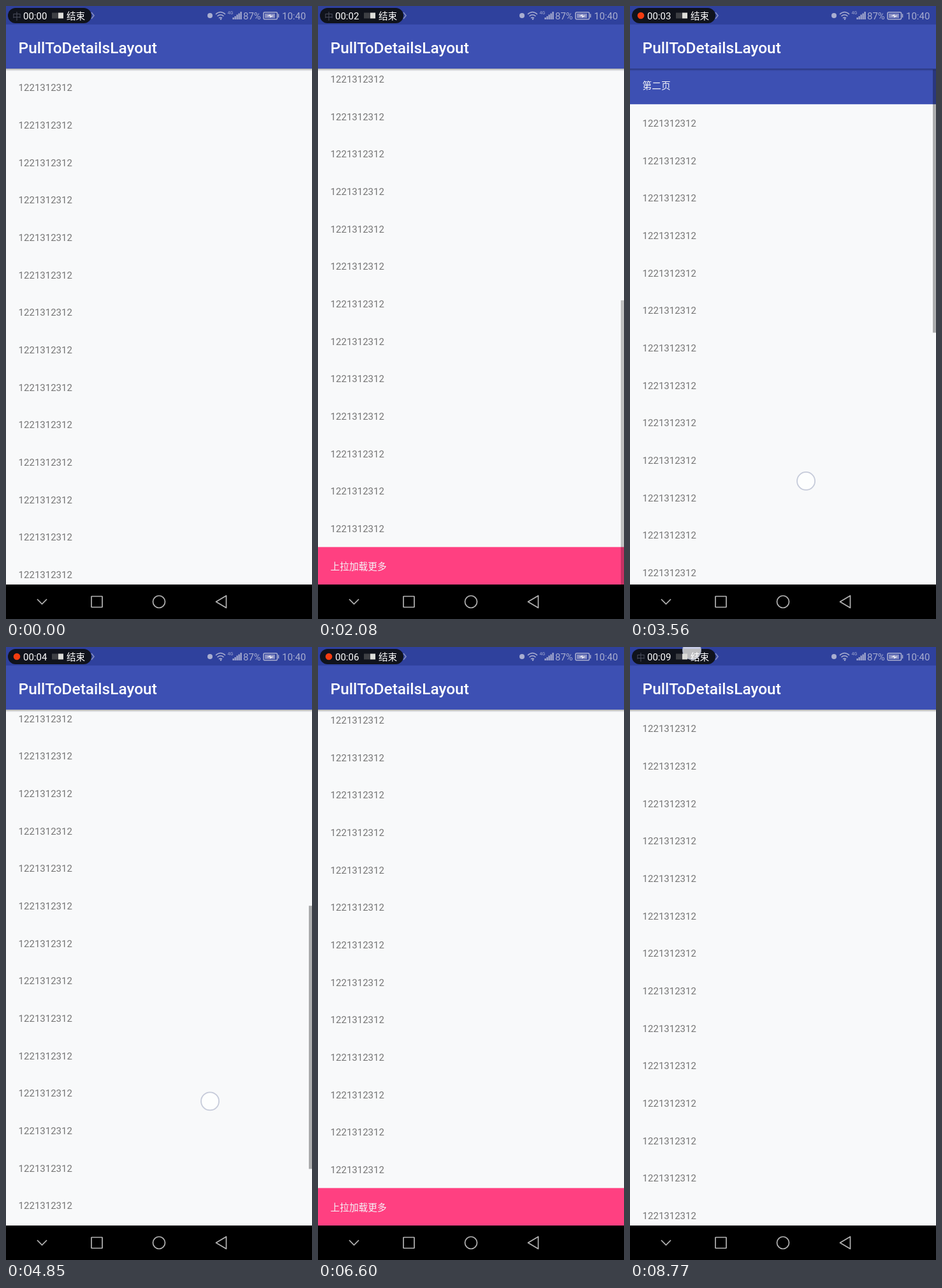
Animation of 480x960 px, one loop 8.81 s. Source, as an HTML page:

```html
<!DOCTYPE html>
<html lang="zh">
<head>
<meta charset="utf-8">
<title>PullToDetailsLayout</title>
<style>
  html, body { margin: 0; width: 100%; height: 100%; overflow: hidden; background: #000; }
  #stage { display: block; width: 100vw; height: 100vh; }
  text { font-family: Roboto, "Noto Sans CJK SC", "Noto Sans CJK", sans-serif; }
  .row { font-size: 15px; fill: #757575; }
  .label { font-size: 14.67px; fill: #f4f4f8; }
  .status { font-size: 15px; fill: #a9aed0; }
  .line { fill: none; stroke: #b4b4b4; stroke-width: 1.7; }
  .thin { fill: none; stroke: #a9aed0; stroke-width: 1.6; }
</style>
</head>
<body>
<svg id="stage" viewBox="0 0 480 960">
  <defs>
    <linearGradient id="shade" x2="0" y2="1">
      <stop offset="0" stop-color="#000" stop-opacity=".32"/>
      <stop offset="1" stop-color="#000" stop-opacity="0"/>
    </linearGradient>
  </defs>

  <svg y="98" width="480" height="808">
    <rect width="480" height="808" fill="#f8f9fa"/>
    <svg id="first" width="480" height="808"><g></g><rect x="475" width="5" fill="#000"/></svg>
    <svg id="second" width="480" height="808"><g></g><rect x="475" width="5" fill="#000"/></svg>
    <rect width="480" height="4" fill="url(#shade)"/>
  </svg>

  <rect width="480" height="30" fill="#2f419d"/>
  <rect y="29" width="480" height="69" fill="#3d50b3"/>
  <text x="19.6" y="74" font-size="24.44" font-weight="500" fill="#fff">PullToDetailsLayout</text>

  <!-- status icons -->
  <circle cx="320" cy="15" r="4" fill="#a9aed0"/>
  <path class="thin" d="M329 13q7.5-7 15 0M331.500 16q5-4.500 10 0M334 19q2.500-2 5 0"/>
  <circle cx="337" cy="20.500" r="1.200" fill="#a9aed0"/>
  <text x="347.500" y="13" font-size="7" fill="#a9aed0">4G</text>
  <path d="M355.500 21v-3h2.200v3zM358.500 21v-5h2.200v5zM361.500 21v-7.500h2.200v7.500zM364.500 21v-9.500h2.200v9.500zM367.500 21v-12h2.200v12z" fill="#a9aed0"/>
  <text class="status" x="372" y="20.500">87%</text>
  <rect class="thin" x="404" y="9.800" width="21.500" height="11" rx="2"/>
  <rect x="406" y="11.800" width="16" height="7" fill="#8a90c4"/>
  <path d="M409 16l6-3v2h5l-6 3.500v-2.500z" fill="#e6e6f2"/>
  <path d="M427.500 12.500v5.500" stroke="#a9aed0" stroke-width="1.500"/>
  <text class="status" x="433" y="20.500">10:40</text>

  <!-- navigation bar -->
  <rect y="906" width="480" height="54"/>
  <path class="line" d="M49 929l7.500 7.500 7.500-7.500"/>
  <rect class="line" x="134" y="924.500" width="17" height="17" rx=".5"/>
  <circle class="line" cx="240" cy="933" r="9.500"/>
  <path class="line" stroke-linejoin="round" d="M345.500 923.500v19l-16-9.500z"/>

  <!-- recorder pill; the touch mark passes below its text -->
  <path class="thin" d="M134 10l4 5-4 5" opacity=".7"/>
  <rect x="3" y="3" width="131" height="24" rx="12" fill="#10131c"/>
  <circle id="touch" r="14" fill="#fff" fill-opacity=".72" stroke="#bcc2d4" stroke-opacity=".85" stroke-width="1.800"/>
  <text id="carrier" x="10" y="20.500" font-size="14" fill="#474a58">中</text>
  <circle id="dot" cx="17" cy="15" r="5.300" fill="#f43c10"/>
  <text id="clock" x="27" y="20.500" font-size="15" fill="#fff"></text>
  <rect x="72" y="10.500" width="10" height="9" fill="#3d3f44"/>
  <rect x="82" y="10.500" width="8" height="9" fill="#dcdcd8"/>
  <text x="95" y="20.700" font-size="14.600" fill="#fff">结束</text>
</svg>
<script>
const LOOP = 8810, VIEW = 808, ROW = 176 / 3;
const $ = id => document.getElementById(id);

const linear = p => p;
const outQuad = p => 1 - (1 - p) ** 2;
const outCubic = p => 1 - (1 - p) ** 3;

// Keys are [time, value, easing into this key].
function track(keys, t) {
  if (t <= keys[0][0]) return keys[0][1];
  for (let i = 1; i < keys.length; i++) {
    const [t0, v0] = keys[i - 1], [t1, v1, ease = linear] = keys[i];
    if (t < t1) return v0 + (v1 - v0) * ease((t - t0) / (t1 - t0));
  }
  return keys[keys.length - 1][1];
}

function makePage(id, rows, special, label, color) {
  const svg = $(id), [list, thumb] = svg.children, height = rows * ROW;
  let markup = "";
  for (let i = 0; i < rows; i++) {
    const y = i * ROW, base = y + 35.2;
    markup += i === special
      ? `<rect y="${y}" width="480" height="${ROW}" fill="${color}"/><text class="label" x="19.6" y="${base}">${label}</text>`
      : `<text class="row" x="19.6" y="${base}">1221312312</text>`;
  }
  list.innerHTML = markup;
  thumb.setAttribute("height", VIEW * VIEW / height);
  return { svg, list, thumb, height, end: height - VIEW };
}

const first = makePage("first", 25, 24, "上拉加载更多", "#ff4081");
const second = makePage("second", 27, 0, "第二页", "#3d50b3");

first.scroll = [[500, 0], [760, 230], [1718, first.end, outQuad],
  [6750, first.end], [7000, 430], [7950, 0, outQuad]];
first.active = [[500, 1718], [6750, 7950]];
second.scroll = [[3545, 0], [3562, 3], [3830, 290], [4600, second.end, outQuad],
  [4710, second.end], [4850, 603.7], [4980, 420], [5372, 0, outQuad]];
second.active = [[3545, 4600], [4710, 5372]];

const pageShift = [[2250, 0], [2650, 330], [3100, VIEW, outCubic],
  [5600, VIEW], [5860, 735], [6020, 600], [6450, 0, outCubic]];

// Each gesture is a list of [time, x, y].
const gestures = [
  [[480, 300, 770], [760, 330, 520]],
  [[2230, 290, 760], [2650, 310, 430]],
  [[3500, 275, 748], [3560, 276, 745], [3830, 300, 458]],
  [[4690, 310, 537], [4850, 320, 710], [4980, 325, 890]],
  [[5580, 245, 670], [5860, 257, 743], [6020, 270, 878]],
  [[6730, 290, 500], [7000, 310, 730]],
  [[8640, 97, 6], [LOOP, 97, 5]]
];

// Scrollbars wait 300 ms after a scroll, then fade for 250 ms.
function thumbOpacity(spans, t) {
  return Math.max(0, ...spans.map(([from, to]) =>
    t < from ? 0 : Math.min(1, 1 - (t - to - 300) / 250)));
}

function drawPage(page, top, t) {
  const scroll = track(page.scroll, t);
  page.svg.setAttribute("y", top);
  page.list.setAttribute("transform", `translate(0 ${-scroll})`);
  page.thumb.setAttribute("y", scroll * VIEW / page.height);
  page.thumb.setAttribute("opacity", 0.31 * thumbOpacity(page.active, t));
}

function drawTouch(t) {
  const path = gestures.find(g => t >= g[0][0] && t < g[g.length - 1][0]);
  const touch = $("touch");
  touch.style.display = path ? "" : "none";
  if (!path) return;
  touch.setAttribute("cx", track(path.map(([at, x]) => [at, x]), t));
  touch.setAttribute("cy", track(path.map(([at, , y]) => [at, y]), t));
}

function render(t) {
  const shift = track(pageShift, t);
  drawPage(first, -shift, t);
  drawPage(second, VIEW - shift, t);
  drawTouch(t);

  const recorded = Math.max(0, t * 1.04 - 110) / 1000;
  const lit = recorded % 1 >= 0.5;
  $("clock").textContent = "00:0" + Math.floor(recorded);
  $("dot").style.display = lit ? "" : "none";
  $("carrier").style.display = lit ? "none" : "";
}

const start = performance.now();
function tick() {
  render((performance.now() - start) % LOOP);
  requestAnimationFrame(tick);
}
tick();
</script>
</body>
</html>
```
